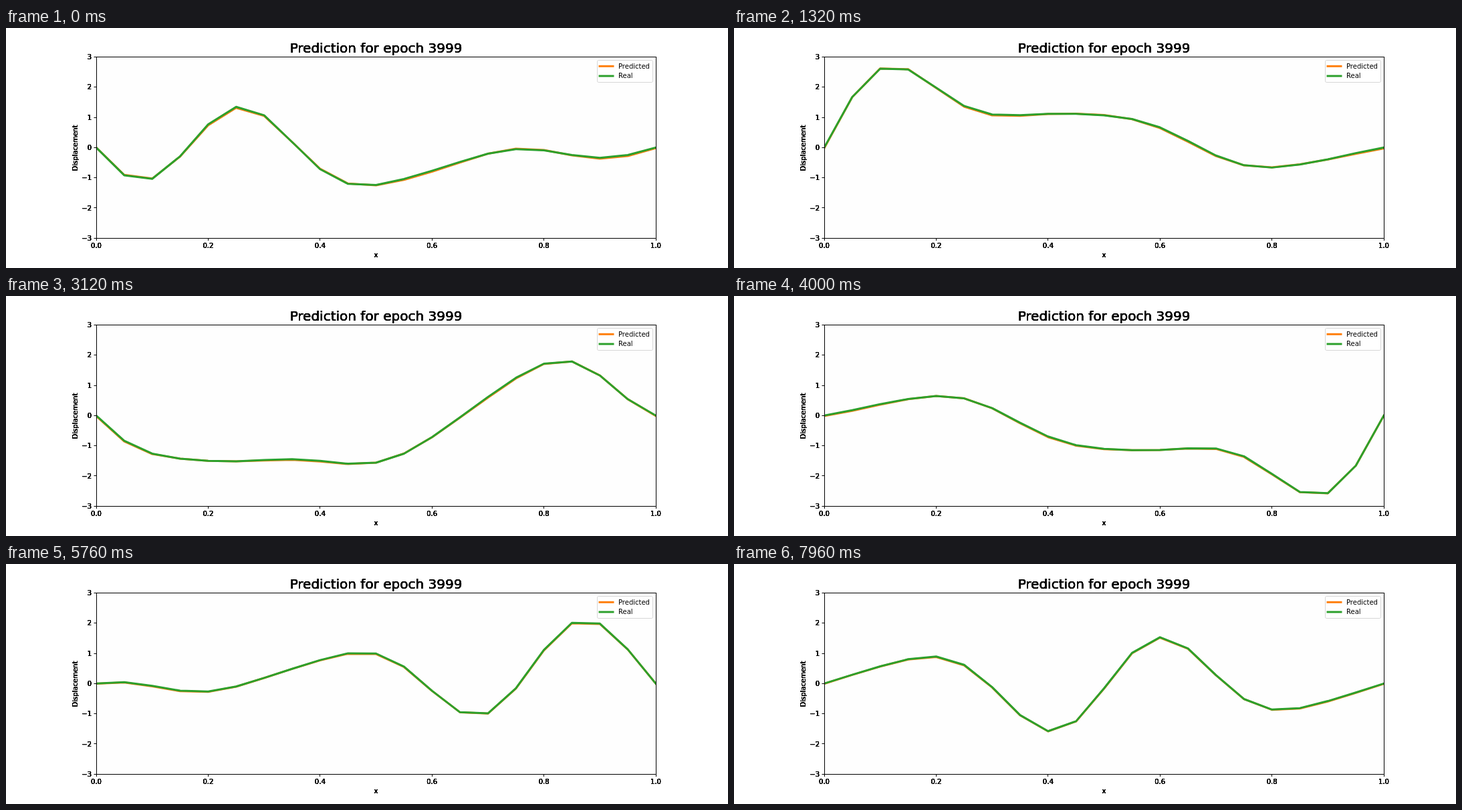
Write an HTML page that moves like this. It is 1080 px wide and 360 px high and loops after 8000 ms.

```html
<!DOCTYPE html>
<html lang="en">
<head>
<meta charset="utf-8">
<title>Displacement</title>
<style>
  html, body { margin: 0; width: 100%; height: 100%; overflow: hidden; background: #fff; }
  svg { display: block; width: 1080px; height: 360px; }
  text { font: 10px "DejaVu Sans", sans-serif; fill: #000; }
  .title { font-size: 20px; }
  .axis { fill: none; stroke: #000; stroke-width: 1; }
  .curve { fill: none; stroke-width: 3; stroke-linecap: square; stroke-linejoin: round; }
</style>
</head>
<body>
<svg id="stage" viewBox="0 0 1080 360">
  <clipPath id="area"><rect x="135" y="43" width="838" height="273"/></clipPath>
  <rect x="135" y="43" width="837" height="272" fill="#fefefe"/>
  <g clip-path="url(#area)">
    <polyline id="predicted" class="curve" stroke="#ff7f0e"/>
    <polyline id="real" class="curve" stroke="#2ca02c"/>
  </g>
  <rect class="axis" x="135.5" y="43.5" width="837" height="272"/>
  <path id="ticks" class="axis"/>
  <g id="labels"></g>
  <rect x="884.5" y="48.5" width="83" height="33" rx="2" fill="#fff" fill-opacity=".8" stroke="#ccc" stroke-opacity=".8"/>
  <path class="curve" stroke="#ff7f0e" d="M888 57.3H908"/>
  <path class="curve" stroke="#2ca02c" d="M888 72H908"/>
  <text x="916" y="60.5">Predicted</text>
  <text x="916" y="75.2">Real</text>
</svg>
<script>
const FRAME = 40, COUNT = 200, STEP = 0.015, CELLS = 20;
const AMPS = [0.16, 0.99, 1.705, 0.686, 0.303];
const byId = id => document.getElementById(id);
const px = x => 135 + 837 * x;
const py = u => 179.3 - 45.3 * u;

// Axis text is painted several times, which hardens its edges.
function label(str, x, y, anchor, extra = {}) {
  for (let i = 0; i < 6; i++) {
    const el = document.createElementNS("http://www.w3.org/2000/svg", "text");
    const attrs = { x, y, "text-anchor": anchor, ...extra };
    for (const key in attrs) el.setAttribute(key, attrs[key]);
    el.textContent = str;
    byId("labels").append(el);
  }
}

function drawAxes() {
  let d = "";
  for (let i = 0; i <= 5; i++) {
    const x = px(i / 5);
    d += `M${Math.floor(x) + 0.5} 316v3`;
    label((i / 5).toFixed(1), x, 330, "middle");
  }
  for (let v = -3; v <= 3; v++) {
    const y = py(v);
    d += `M135 ${Math.floor(y) + 0.5}h-3.5`;
    label(String(v).replace("-", "\u2212"), 128, y + 3.7, "end");
  }
  byId("ticks").setAttribute("d", d);
  label("x", 553.5, 343.6, "middle");
  label("Displacement", 0, 0, "middle", { transform: "translate(106.8 180) rotate(-90)" });
  label("Prediction for epoch 3999", 553.5, 37, "middle", { class: "title" });
}

// Modes of a string moving along its axis: waves run right three times as fast as left.
const wave = (x, t) => AMPS.reduce((sum, a, i) => {
  const k = (i + 1) * Math.PI;
  return sum + a * Math.sin(k * x) * Math.cos(k / 2 * (t + x - 0.5));
}, 0);

const misfit = (x, t) => -0.01 + 0.025 * Math.exp(-t / 2) * Math.cos(18 * x - 1.2 - 2 * t);

function plot(id, fn) {
  const pts = [];
  for (let j = 0; j <= CELLS; j++) {
    const x = j / CELLS;
    pts.push(px(x).toFixed(2) + "," + py(fn(x)).toFixed(2));
  }
  byId(id).setAttribute("points", pts.join(" "));
}

function draw(ms) {
  const t = Math.floor(ms / FRAME) % COUNT * STEP;
  plot("predicted", x => wave(x, t) + misfit(x, t));
  plot("real", x => wave(x, t));
}

drawAxes();
draw(0);
let start = null;
function tick(now) {
  if (start === null) start = now;
  draw(now - start);
  requestAnimationFrame(tick);
}
requestAnimationFrame(tick);
</script>
</body>
</html>
```
